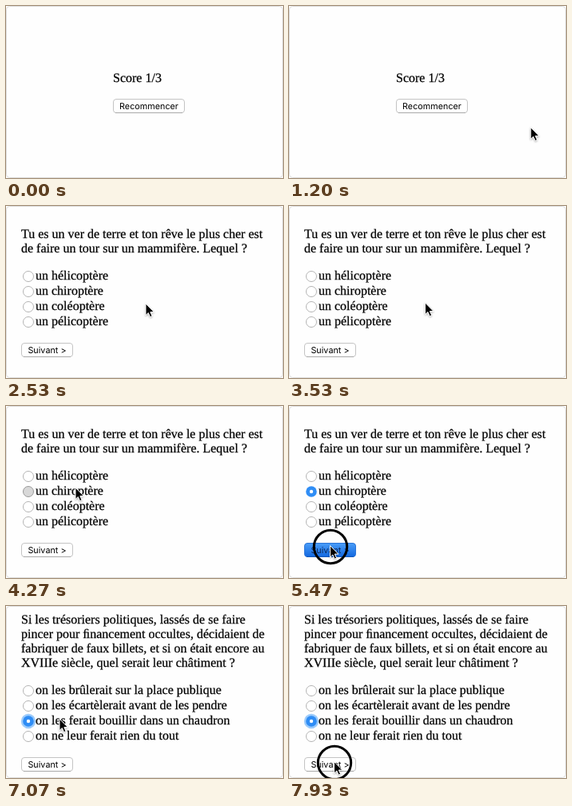
An HTML page that plays this animation: 347x215 px, repeating every 8000 ms.

```html
<!DOCTYPE html>
<html lang="fr">
<head>
<meta charset="utf-8">
<style>
html, body { margin: 0; width: 100%; height: 100%; overflow: hidden; background: #fff; }
svg { display: block; }
text { font: 16px "Liberation Serif", serif; text-rendering: geometricPrecision; stroke: #000; stroke-width: .25px; }
.label { font: 10.8px Inter, sans-serif; text-anchor: middle; stroke: none; }
</style>
</head>
<body>
<svg id="stage" width="347" height="215" viewBox="0 0 347 215">
  <defs>
    <linearGradient id="blue" x2="0" y2="1">
      <stop stop-color="#4a9df8"/><stop offset="1" stop-color="#1268e0"/>
    </linearGradient>
    <filter id="shadow" x="-50%" y="-50%" width="200%" height="200%">
      <feDropShadow dx="0" dy="1" stdDeviation=".8" flood-opacity=".35"/>
    </filter>
  </defs>
  <rect x=".5" y=".5" width="346" height="214" rx="4" fill="#fefefe" stroke="#dedede"/>
  <g id="page"></g>
  <circle id="ring" r="20.7" fill="none" stroke="#000" stroke-width="3"/>
  <path id="cursor" d="M0 0V14.6L3.3 11.5 5.6 16.7 8.1 15.6 5.8 10.6H10.4Z" stroke="#fff" filter="url(#shadow)"/>
</svg>
<script>
const FPS = 15, LOOP = 8000;
const $ = id => document.getElementById(id);

const quiz = [
  { top: 40,
    question: ['Tu es un ver de terre et ton rêve le plus cher est',
               'de faire un tour sur un mammifère. Lequel ?'],
    answers: ['un hélicoptère', 'un chiroptère', 'un coléoptère', 'un pélicoptère'],
    choice: 1, press: 64, select: 66 },
  { top: 22,
    question: ['Si les trésoriers politiques, lassés de se faire',
               'pincer pour ﬁnancement occultes, décidaient de',
               'fabriquer de faux billets, et si on était encore au',
               'XVIIIe siècle, quel serait leur châtiment ?'],
    answers: ['on les brûlerait sur la place publique',
              'on les écartèlerait avant de les pendre',
              'on les ferait bouillir dans un chaudron',
              'on ne leur ferait rien du tout'],
    choice: 2, press: 104, select: 105 }
];

// Pointer stops: tick, x, y
const stops = [[15, 338, 160], [25, 175, 122], [51.6, 175, 122], [62, 87, 102], [65, 87, 102],
               [76, 51.5, 174.5], [93, 51.5, 174.5], [103, 67, 141], [108, 67, 141], [118, 56.5, 194.5]];
const clicks = [35, 80, 119], CLICK_LENGTH = 3;

const line = (x, y, s) => `<text x="${x}" y="${y}">${s}</text>`;

function button(x, y, w, label, pressed) {
  const fill = pressed ? 'url(#blue)' : '#fff', stroke = pressed ? '#2a74d8' : '#c4c4c4';
  return `<rect x="${x + .5}" y="${y + .5}" width="${w - 1}" height="17" rx="3.5" fill="${fill}" stroke="${stroke}"/>
    <path d="M${x + 3} ${y + 17.5}h${w - 6}" stroke="${pressed ? '#1558b8' : '#a9a9a9'}"/>
    <text class="label" x="${x + w / 2}" y="${y + 13}" fill="${pressed ? '#0b2a5c' : '#000'}">${label}</text>`;
}

function radio(y, state, focused) {
  const dot = (r, style) => `<circle cx="28" cy="${y}" r="${r}" ${style}/>`;
  if (state === 'on')
    return (focused ? dot(9.2, 'fill="#9ccbfb"') : '') + dot(6.8, 'fill="#2f8df5"') + dot(2.2, 'fill="#fff"');
  return dot(6.5, state === 'down' ? 'fill="#d8d8d8" stroke="#999"' : 'fill="#fff" stroke="#b4b4b4"');
}

function quizPage({ top, question, answers, choice, press, select }, tick, pressed) {
  const first = top + 18 * question.length + 16;
  const state = tick >= select ? 'on' : tick >= press ? 'down' : 'off';
  return question.map((s, i) => line(19, top + 18 * i, s)).join('') +
    answers.map((s, i) => {
      const y = first + 19 * i;
      return radio(y - 4, i === choice ? state : 'off', !pressed) + line(37, y, s);
    }).join('') +
    button(19, first + 79, 65, 'Suivant &gt;', pressed);
}

function pointer(tick) {
  const next = stops.findIndex(s => s[0] > tick);
  if (next < 1) return stops.at(next < 0 ? -1 : 0).slice(1);
  const [t0, x0, y0] = stops[next - 1], [t1, x1, y1] = stops[next];
  const u = (tick - t0) / (t1 - t0), e = u * u * (3 - 2 * u);
  return [x0 + (x1 - x0) * e, y0 + (y1 - y0) * e];
}

function draw(tick) {
  const click = clicks.find(c => tick >= c && tick < c + CLICK_LENGTH);
  const pressed = tick > click;
  const pageNo = clicks.filter(c => tick >= c + CLICK_LENGTH).length;
  $('page').innerHTML = pageNo
    ? quizPage(quiz[pageNo - 1], tick, pressed)
    : line(134, 95, 'Score 1/3') + button(134, 116, 90, 'Recommencer', pressed);

  const [x, y] = pointer(tick);
  $('cursor').setAttribute('transform', `translate(${x} ${y})`);
  $('cursor').style.display = tick < 16 ? 'none' : '';
  $('ring').setAttribute('transform', `translate(${x + .5} ${y + 1.5})`);
  $('ring').style.display = click ? '' : 'none';
}

const start = performance.now();
let shown = -1;
function frame() {
  const time = (performance.now() - start) % LOOP;
  const tick = Math.min(119, Math.floor((time + 5) * FPS / 1000));
  if (tick !== shown) draw(shown = tick);
  requestAnimationFrame(frame);
}
frame();
</script>
</body>
</html>
```
